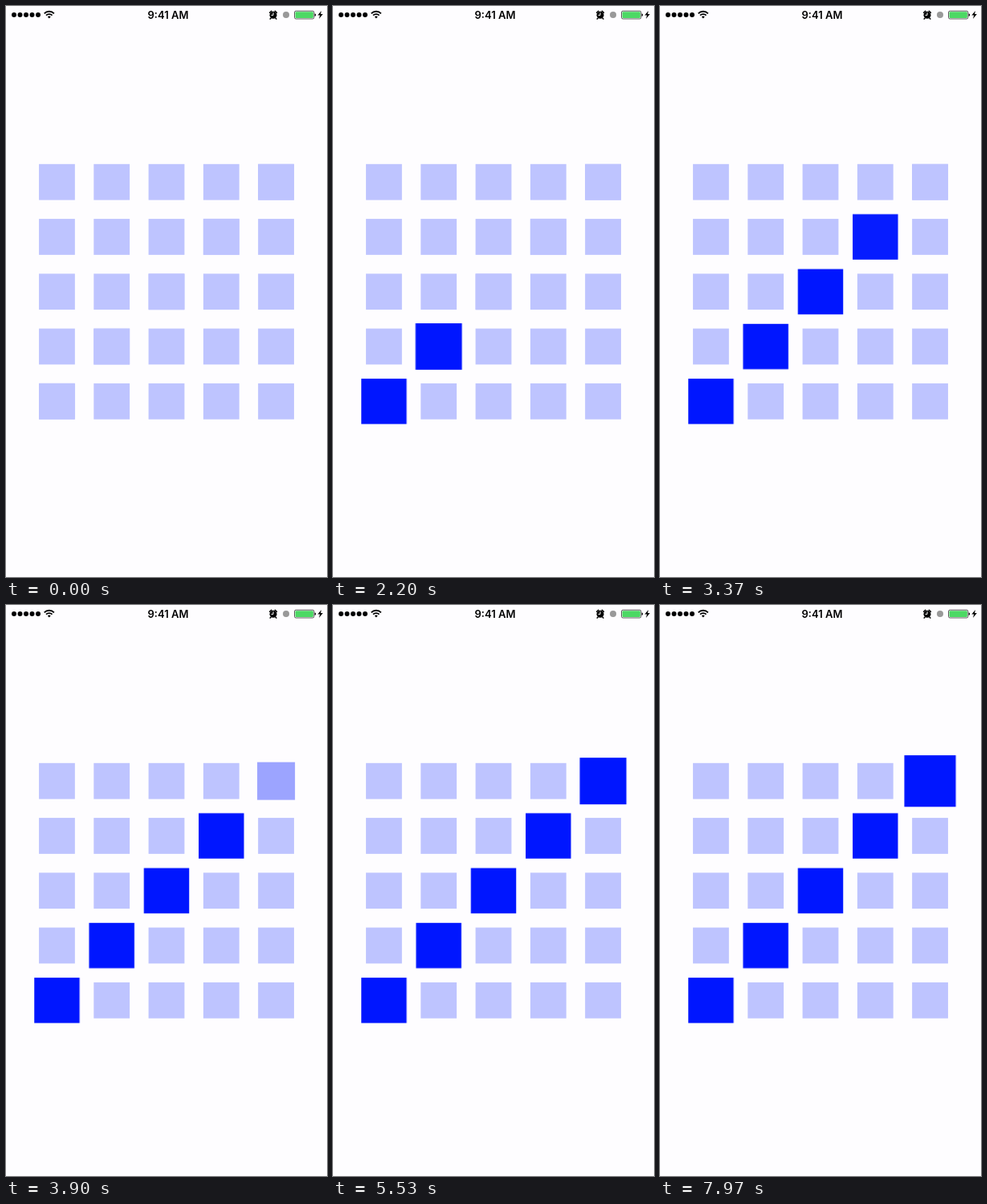
An HTML page without scripts for the animation above (8 s loop, 400x711 px).

```html
<!DOCTYPE html>
<html lang="en">
<head>
<meta charset="utf-8">
<title>Diagonal grid selection</title>
<style>
  html, body { margin: 0; width: 100%; height: 100%; overflow: hidden; background: #fefdff; }
  svg { display: block; width: 400px; height: 711px; }
  :root { --pale: #bec4ff; --blue: #0016ff; }
  .grid { fill: var(--pale); }
  .clock { font: 600 13px Inter, "Liberation Sans", sans-serif; text-anchor: middle; }

  .cell {
    fill: var(--pale);
    transform-box: fill-box;
    transform-origin: center;
    animation: 8s cubic-bezier(.37, 0, .63, 1) infinite;
  }
  .c0 { animation-name: first; }
  .c1 { animation-name: second; }
  .c2 { animation-name: third; }
  .c3 { animation-name: fourth; }
  .c4 { animation-name: last; }

  /* Each cell pops up, swells while touched, then rests at 1.26. */
  @keyframes first {
    0%, 17.35% { fill: var(--pale); transform: scale(1); }
    18.6% { fill: var(--blue); }
    19.75% { transform: scale(1.46); }
    24.5%, 100% { fill: var(--blue); transform: scale(1.26); }
  }
  @keyframes second {
    0%, 25.4% { fill: var(--pale); transform: scale(1); }
    26.8% { fill: var(--blue); transform: scale(1.27); }
    30% { transform: scale(1.45); }
    33.4%, 100% { fill: var(--blue); transform: scale(1.26); }
  }
  @keyframes third {
    0%, 33.5% { fill: var(--pale); transform: scale(1); }
    34.75% { fill: var(--blue); transform: scale(1.28); }
    38.2% { transform: scale(1.45); }
    41%, 100% { fill: var(--blue); transform: scale(1.26); }
  }
  @keyframes fourth {
    0%, 40.9% { fill: var(--pale); transform: scale(1); }
    42.3% { fill: var(--blue); transform: scale(1.27); }
    45.4% { transform: scale(1.45); }
    48.5%, 100% { fill: var(--blue); transform: scale(1.26); }
  }
  @keyframes last {
    0%, 48.35% { fill: var(--pale); transform: scale(1); animation-timing-function: linear; }
    48.75% { fill: #9ca4ff; transform: scale(1.05); }
    50% { fill: var(--blue); transform: scale(1.27); }
    53.56%, 63.01%, 72.46%, 81.91%, 91.36% { transform: scale(1.455); }
    58.29%, 67.74%, 77.19%, 86.64%, 96.09% { transform: scale(1.257); }
    100% { fill: var(--blue); transform: scale(1.435); }
  }
</style>
</head>
<body>
<svg viewBox="0 0 400 711">
  <defs>
    <rect id="box" width="44.8" height="44.8"/>
    <g id="row">
      <use href="#box"/>
      <use href="#box" x="68.27"/>
      <use href="#box" x="136.54"/>
      <use href="#box" x="204.81"/>
      <use href="#box" x="273.08"/>
    </g>
  </defs>

  <g class="status">
    <g>
      <circle cx="10" cy="11" r="3"/>
      <circle cx="17.5" cy="11" r="3"/>
      <circle cx="25" cy="11" r="3"/>
      <circle cx="32.5" cy="11" r="3"/>
      <circle cx="40" cy="11" r="3"/>
    </g>
    <g fill="none" stroke="#000" stroke-width="1.8">
      <path d="M47.7 9.3a8.6 8.6 0 0 1 12.2 0M50 11.7a5.4 5.4 0 0 1 7.6 0"/>
    </g>
    <path d="M51.9 13.5a2.7 2.7 0 0 1 3.8 0L53.8 15.6z"/>
    <text class="clock" x="202" y="15.5">9:41 AM</text>
    <g fill="none" stroke="#000" stroke-width="1.5" stroke-linecap="round">
      <path d="M328.6 8.2l2.2-2M337.4 8.2l-2.2-2M330 15.2l-.8.9M336 15.2l.8.9"/>
      <circle cx="333" cy="11.2" r="4.5" fill="#000" stroke="none"/>
      <path d="M333 8.6v2.8h-2.2" stroke="#fff" stroke-width="1"/>
    </g>
    <circle cx="349" cy="11" r="4" fill="#999"/>
    <rect x="359.5" y="6.2" width="24.4" height="9.8" rx="1.8" fill="#fefdff" stroke="#333" stroke-width=".8"/>
    <rect x="360.5" y="7.2" width="22.4" height="7.8" rx="1" fill="#4cd964"/>
    <path d="M384.6 9.2q1.6.3 1.6 1.9t-1.6 1.9z"/>
    <path d="M393 6l-4.6 5.6h2.8L390 16l4.9-6h-2.8z"/>
  </g>

  <g class="grid" transform="translate(41.07 196.8)">
    <use href="#row"/>
    <use href="#row" y="68.27"/>
    <use href="#row" y="136.54"/>
    <use href="#row" y="204.81"/>
    <use href="#row" y="273.08"/>
  </g>

  <g transform="translate(41.07 196.8)">
    <rect class="cell c0" y="273.08" width="44.8" height="44.8"/>
    <rect class="cell c1" x="68.27" y="204.81" width="44.8" height="44.8"/>
    <rect class="cell c2" x="136.54" y="136.54" width="44.8" height="44.8"/>
    <rect class="cell c3" x="204.81" y="68.27" width="44.8" height="44.8"/>
    <rect class="cell c4" x="273.08" width="44.8" height="44.8"/>
  </g>
</svg>
</body>
</html>
```
